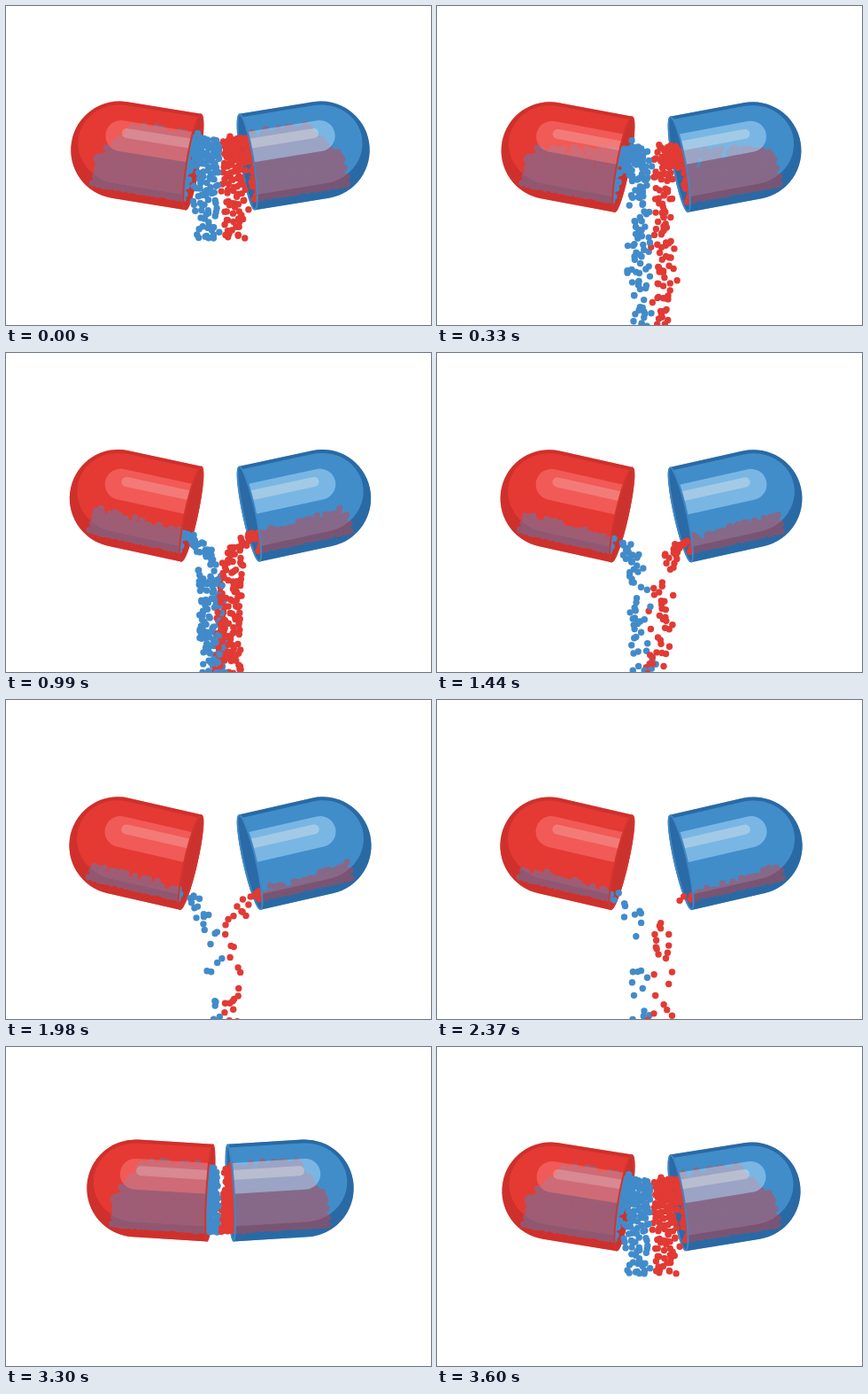
Write an HTML page with a canvas that moves like this. It is 480 px wide and 360 px high and loops after 3630 ms.

```html
<!DOCTYPE html>
<html lang="en">
<head>
<meta charset="utf-8">
<title>Capsule</title>
<style>
  html, body { margin: 0; width: 100%; height: 100%; overflow: hidden; background: #fff; }
  canvas { display: block; width: 480px; height: 360px; }
</style>
</head>
<body>
<canvas id="stage" width="480" height="360"></canvas>
<script>
const ctx = document.getElementById('stage').getContext('2d');
const LOOP = 3630, CLOSE = 2910, OPENING = 420, STEP = 30;
const R = 55, LEN = 84.5, AXIS = 242, MOUTH = 81;
const GRAVITY = 550, SLIDE = 1700, SLOPE = 0.14, FLOOR = 43, DEPTH = 74, BACK = -23;

const sides = [
  { body: '#e53a33', dark: '#cf312c', inside: '#cc322d', rim: '#d2352f',
    shine: '#ff7a7a', glint: 0.22, grain: '#428bca' },
  { body: '#428dcb', dark: '#2a6aa6', inside: '#2a6aa6', rim: '#3f88c6',
    shine: '#b2dfff', glint: 0.32, grain: '#e23a34' }
];

let seed = 7;
function rand() {
  seed = (seed + 0x6D2B79F5) | 0;
  let v = Math.imul(seed ^ (seed >>> 15), 1 | seed);
  v = (v + Math.imul(v ^ (v >>> 7), 61 | v)) ^ v;
  return ((v ^ (v >>> 14)) >>> 0) / 4294967296;
}
const spread = n => (rand() * 2 - 1) * n;
const mix = (a, b, k) => a + (b - a) * k;

// Time u is 0 when the halves are apart; negative while closed or opening.
function pose(u) {
  if (u < 0) {
    const s = Math.max(0, 1 + u / OPENING);
    const k = 1 - (1 - s) ** 2;
    return { x: mix(157.5, 128.3, k), y: mix(157.5, 162.5, k), a: 9.2 * k, open: k };
  }
  const k = 1 - Math.exp(-u / 760);
  return { x: 128.3 - 2 * k, y: 162.5 + 2 * k, a: 9.2 + 4 * k, open: 1 };
}

function toWorld(p, x, y) {
  const a = p.a * Math.PI / 180, c = Math.cos(a), s = Math.sin(a);
  return [p.x + x * c - y * s, p.y + x * s + y * c];
}

// Share of the filling height still in the half at time u.
const level = u => 0.52 * Math.exp(-u / 1900) + 0.48 * Math.exp(-u / 200);

function releaseTime(depth) {
  let lo = 0, hi = CLOSE + 600;
  for (let i = 0; i < 24; i++) {
    const mid = (lo + hi) / 2;
    if (DEPTH * level(mid) > depth) lo = mid; else hi = mid;
  }
  return lo;
}

// Grains run to the mouth along the sloping surface of the pile.
const slideY = (g, moved) => Math.min(FLOOR, g.y + SLOPE * moved);

function makeGrains(side) {
  const list = [], start = pose(0);
  for (let row = 0; row < 17; row++) {
    for (let col = 0; col < 30; col++) {
      const x = BACK + col * 5.1 + (row % 2) * 2.5 + spread(1.4);
      const y = FLOOR - row * 4.7 + spread(1.2);
      const top = Math.max(-31, 10 - (x - BACK) * 1.2);
      if (y < top + spread(3) || (x < 0 && Math.hypot(x, y) > 50)) continue;
      if (toWorld(start, x, y)[0] > AXIS - 1) continue;
      const g = { side, x, y, loose: x > LEN - 1, goal: 219 + rand() * 31, order: rand() };
      if (g.loose) {
        g.out = -370 + (FLOOR - y) / DEPTH * 520 + spread(30);
      } else {
        const path = Math.max(0, MOUTH - x);
        g.out = releaseTime(FLOOR - y + 1 + spread(3.5) + 0.07 * (x - 30));
        g.slide = Math.sqrt(2 * path / SLIDE);
        g.mouth = toWorld(pose(g.out + g.slide * 1000), Math.max(x, MOUTH), slideY(g, path));
      }
      list.push(g);
    }
  }
  return list;
}

const grains = [...makeGrains(0), ...makeGrains(1)].sort((a, b) => a.order - b.order);

function place(g, u) {
  const p = pose(Math.min(u, g.loose ? 0 : u));
  const t = (u - g.out) / 1000;
  if (!g.loose && t > g.slide) {
    const f = t - g.slide, [x, y] = g.mouth;
    return [mix(x, g.goal, 1 - Math.exp(-f / 0.2)), y + 50 * f + GRAVITY / 2 * f * f];
  }
  const x = BACK + (g.x - BACK) * mix(0.76, 1, p.open);
  if (!g.loose) {
    const moved = t > 0 ? SLIDE / 2 * t * t : 0;
    return toWorld(p, x + moved, slideY(g, moved));
  }
  const f = Math.max(0, t), [wx, wy] = toWorld(p, x, g.y);
  return [mix(Math.min(wx, AXIS - 1), g.goal, 1 - Math.exp(-f / 0.9)), wy + GRAVITY / 2 * f * f];
}

function shell(path, top, left, bottom, w) {
  const mid = (top + bottom) / 2, half = (bottom - top) / 2;
  const edge = y => LEN - w * Math.sqrt(Math.max(0, 1 - (y / R) ** 2));
  path.moveTo(edge(top), top);
  path.lineTo(0, top);
  path.ellipse(0, mid, left, half, 0, -Math.PI / 2, Math.PI / 2, true);
  path.lineTo(edge(bottom), bottom);
  path.ellipse(LEN, 0, w, R, 0, Math.PI - Math.asin(bottom / R), Math.PI - Math.asin(top / R));
  path.closePath();
  return path;
}

function inHalf(i, p, draw) {
  ctx.save();
  if (i) {
    ctx.translate(2 * AXIS, 0);
    ctx.scale(-1, 1);
  }
  ctx.translate(p.x, p.y);
  ctx.rotate(p.a * Math.PI / 180);
  draw(sides[i]);
  ctx.restore();
}

function bar(x, y, r, color, alpha) {
  ctx.globalAlpha = alpha;
  ctx.fillStyle = color;
  ctx.beginPath();
  ctx.arc(x, y, r, Math.PI / 2, -Math.PI / 2);
  ctx.lineTo(LEN, y - r);
  ctx.lineTo(LEN, y + r);
  ctx.fill();
}

function drawScene(u) {
  const p = pose(u);
  const w = 7.5 * Math.min(1, p.a / 6) + 0.01;
  const outer = shell(new Path2D(), -R, R, R, w);
  const inner = shell(new Path2D(), -51, 48, 38, w);
  const shade = new Path2D(outer);
  shade.addPath(inner);

  ctx.clearRect(0, 0, 480, 360);

  for (const i of [0, 1]) inHalf(i, p, c => {
    ctx.beginPath();
    ctx.ellipse(LEN, 0, w, R, 0, 0, 2 * Math.PI);
    ctx.fillStyle = c.inside;
    ctx.fill();
    ctx.beginPath();
    ctx.ellipse(LEN, 0, Math.max(0, w - 1), R - 1, 0, -Math.PI / 2, Math.PI / 2);
    ctx.strokeStyle = c.rim;
    ctx.lineWidth = 2;
    ctx.stroke();
    ctx.fillStyle = c.dark;
    ctx.fill(outer);
    ctx.fillStyle = c.body;
    ctx.fill(inner);
  });

  for (const g of grains) {
    let [x, y] = place(g, u);
    if (y > 366) continue;
    if (g.side) x = 2 * AXIS - x;
    ctx.fillStyle = sides[g.side].grain;
    ctx.beginPath();
    ctx.arc(x, y, 3.7, 0, 2 * Math.PI);
    ctx.fill();
  }

  for (const i of [0, 1]) inHalf(i, p, c => {
    ctx.globalAlpha = 0.57;
    ctx.fillStyle = c.dark;
    ctx.fill(shade, 'evenodd');
    ctx.fillStyle = c.body;
    ctx.fill(inner);
    ctx.save();
    ctx.clip(outer);
    bar(-1, -16, 17.5, c.shine, 0.5);
    bar(5, -20, 5.5, '#f8f2ea', c.glint);
    ctx.restore();
    ctx.globalAlpha = 1;
    ctx.beginPath();
    ctx.ellipse(LEN, 0, w, R - 0.5, 0, Math.PI / 2, Math.PI * 1.5);
    ctx.strokeStyle = c.rim;
    ctx.lineWidth = 2;
    ctx.stroke();
  });
}

const begin = performance.now();
function tick(now) {
  const t = Math.floor(Math.max(0, now - begin) % LOOP / STEP) * STEP;
  drawScene(t < CLOSE ? t : t - LOOP);
  requestAnimationFrame(tick);
}
tick(begin);
</script>
</body>
</html>
```
